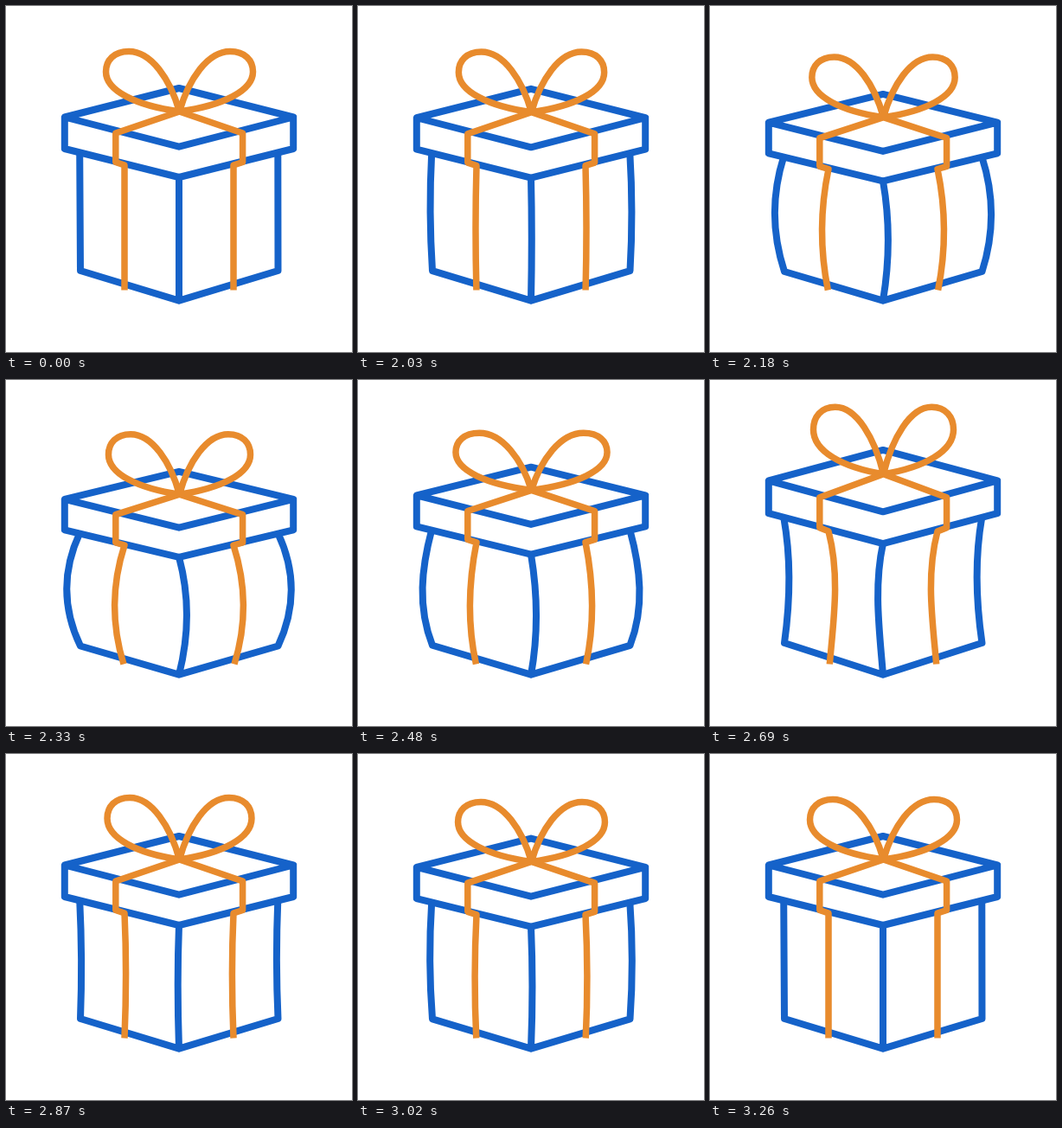
An HTML page that plays this animation: 400x400 px, repeating every 3.35 s.

```html
<!DOCTYPE html>
<html lang="en">
<head>
<meta charset="utf-8">
<title>Gift box</title>
<style>
  html, body { margin: 0; width: 100%; height: 100%; overflow: hidden; background: #fff; }
  svg { display: block; width: 100vw; height: 100vh; }
  path { fill: none; stroke-linejoin: round; }
  .box { stroke: #1562c9; stroke-width: 8; }
  .ribbon { stroke: #e88b2d; stroke-width: 7.5; }
</style>
</head>
<body>
<svg viewBox="0 0 400 400">
  <path id="body" class="box"/>
  <path id="lid" class="box"/>
  <path id="ribbon" class="ribbon"/>
  <path id="bow" class="ribbon"/>
</svg>
<script>
const LOOP = 3350, START = 2000, STEP = 30, LAST = 42;

// step, squash, wall bend (upper, lower), ribbon bend (upper, lower), bow width, bow height
const KEYS = [
  [0, 0, 0, 0, 0, 0, 1, 1],
  [1, .08, 2.7, 2.7, 1.3, 1.3, .99, 1.003],
  [11, 1, 20.5, 20.5, 14.5, 14.5, .965, 1],
  [19, 0, 4, 13, 3, 6, 1.06, .93],
  [23, -1.3, -8.5, -7, -13, -5, .953, 1.115],
  [29, 0, -2, -2, -2.2, -2, .982, 1.03],
  [33, .3, 4, 4, 3, 3, 1, .99],
  [37, -.07, -1, -1, -1, -1, .995, 1.012],
  [LAST, 0, 0, 0, 0, 0, 1, 1]
];

const slope = (i, c) => (KEYS[i + 1][c] - KEYS[i][c]) / (KEYS[i + 1][0] - KEYS[i][0]);

// Flat at turning points, averaged slope elsewhere
function tangent(i, c) {
  if (i === 0) return slope(0, c);
  if (i === KEYS.length - 1) return 0;
  const a = slope(i - 1, c), b = slope(i, c);
  return a * b <= 0 ? 0 : 2 * a * b / (a + b);
}

function channel(n, c) {
  let i = 0;
  while (i < KEYS.length - 2 && n >= KEYS[i + 1][0]) i++;
  const [a, b] = [KEYS[i], KEYS[i + 1]];
  const h = b[0] - a[0], u = (n - a[0]) / h, v = 1 - u;
  return a[c] * v * v * (1 + 2 * u) + b[c] * u * u * (1 + 2 * v)
    + h * u * v * (tangent(i, c) * v - tangent(i + 1, c) * u);
}

const pt = (x, y) => x.toFixed(2) + ' ' + y.toFixed(2);
const line = (...p) => 'M' + p.map(q => pt(...q)).join('L');

// Bent edge between two points, pushed sideways by a (upper) and b (lower)
function bend([x0, y0], [x1, y1], a, b) {
  const dx = (x1 - x0) / 3, dy = (y1 - y0) / 3;
  return 'C' + [pt(x0 + dx + a, y0 + dy), pt(x1 - dx + b, y1 - dy), pt(x1, y1)].join(' ');
}

const LOOP_SHAPE = [
  [-10.5, -37], [-32.5, -69.5], [-58.5, -69.5],
  [-75.5, -69.5], [-85, -59.5], [-85, -46],
  [-85, -24], [-50.5, -7], [0, 0]
];

const set = (id, d) => document.getElementById(id).setAttribute('d', d);

function draw(n) {
  const [s, wu, wl, ru, rl, bw, bh] = [1, 2, 3, 4, 5, 6, 7].map(c => channel(n, c));
  const knot = [200.5, 122 + 10.2 * s];

  const tl = [85.2, 169 + 8 * s], tr = [314.3, 169 + 8 * s];
  const bl = [86, 306 + 1.5 * s], br = [314.5, 306 + 1.5 * s];
  const front = [200, 198 + 6.8 * s], foot = [200, 340.7];
  set('body', 'M' + pt(...tl) + bend(tl, bl, -wu, -wl)
    + 'L' + pt(...foot) + 'L' + pt(...br) + bend(br, tr, wl, wu)
    + 'M' + pt(...front) + bend(front, foot, ru * .85, rl * .8));

  const side = 128.5 + 9.4 * s, low = 165 + 8.3 * s;
  const left = [67.8, side], right = [332.2, side], mid = [200, 162.7 + 8 * s];
  set('lid', line(left, [200, 95 + 10.8 * s], right, mid) + 'Z'
    + line(left, [67.8, low], front, [332.2, low], right));

  const strip = dir => {
    const x = 200.2 + 73.4 * dir, xi = 200 + 63 * dir;
    const top = [xi, 184 + 7 * s], end = [xi + dir * s, 328.5];
    return line(knot, [x, 147 + 8.6 * s], [x, 180.5 + 7.5 * s], top)
      + bend(top, end, ru * dir, rl * dir);
  };
  set('ribbon', strip(-1) + strip(1));

  const wing = dir => 'M' + pt(...knot) + 'C'
    + LOOP_SHAPE.map(([x, y]) => pt(knot[0] + x * bw * dir, knot[1] + y * bh)).join(' ');
  set('bow', wing(1) + wing(-1));
}

function tick() {
  const t = performance.now() % LOOP;
  draw(Math.max(0, Math.min(LAST, Math.floor((t - START) / STEP))));
  requestAnimationFrame(tick);
}
tick();
</script>
</body>
</html>
```
